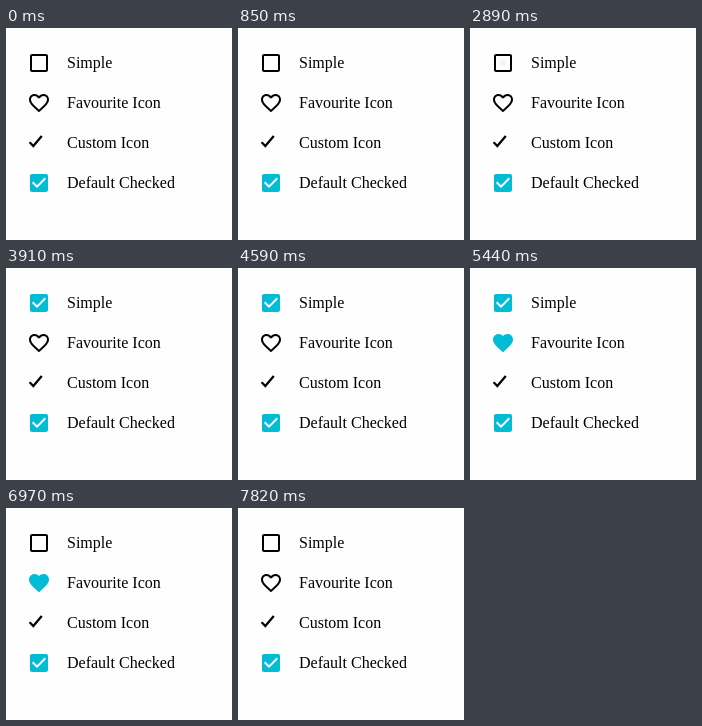
Recreate the animation shown at these times as an HTML page. Size 226x212 px, loop 7990 ms.

```html
<!DOCTYPE html>
<html lang="en">
<head>
<meta charset="utf-8">
<title>Checkboxes</title>
<style>
  html, body { margin: 0; width: 100%; height: 100%; overflow: hidden; background: #fefefe; }
  svg { display: block; width: 100vw; height: 100vh; }
  text { font: 16px "Liberation Serif", "Times New Roman", serif; fill: #000; }
  .on { fill: #00bcd4; }
</style>
</head>
<body>
<svg viewBox="0 0 226 212">
  <defs>
    <path id="box" d="M19 5v14H5V5h14m0-2H5c-1.1 0-2 .9-2 2v14c0 1.1.9 2 2 2h14c1.1 0 2-.9 2-2V5c0-1.1-.9-2-2-2z"/>
    <path id="checked" d="M19 3H5c-1.11 0-2 .9-2 2v14c0 1.1.89 2 2 2h14c1.11 0 2-.9 2-2V5c0-1.1-.89-2-2-2zm-9 14l-5-5 1.41-1.41L10 14.17l7.59-7.59L19 8l-9 9z"/>
    <path id="heart" d="M12 21.35l-1.45-1.32C5.4 15.36 2 12.28 2 8.5 2 5.42 4.42 3 7.5 3c1.74 0 3.41.81 4.5 2.09C13.09 3.81 14.76 3 16.5 3 19.58 3 22 5.42 22 8.5c0 3.78-3.4 6.86-8.55 11.54L12 21.35z"/>
    <path id="heartLine" d="M16.5 3c-1.74 0-3.41.81-4.5 2.09C10.91 3.81 9.24 3 7.5 3 4.42 3 2 5.42 2 8.5c0 3.78 3.4 6.86 8.55 11.54L12 21.35l1.45-1.32C18.6 15.36 22 12.28 22 8.5 22 5.42 19.58 3 16.5 3zm-4.4 15.55l-.1.1-.1-.1C7.14 14.24 4 11.39 4 8.5 4 6.5 5.5 5 7.5 5c1.54 0 3.04.99 3.57 2.36h1.87C13.46 5.99 14.96 5 16.5 5c2 0 3.5 1.5 3.5 3.5 0 2.89-3.14 5.74-7.9 10.05z"/>
  </defs>
  <g transform="translate(21 23)">
    <circle id="press" cx="12" cy="12" r="3" fill="#eff3f7"/>
    <use id="simpleOff" href="#box"/>
    <use id="simpleOn" class="on" href="#checked"/>
    <text x="40" y="17">Simple</text>
  </g>
  <g transform="translate(21 63)">
    <use id="heartOff" href="#heartLine"/>
    <use id="heartOn" class="on" href="#heart"/>
    <text x="40" y="17">Favourite Icon</text>
  </g>
  <g transform="translate(21 103)">
    <path d="M2.6 11.2L6.3 15L14.8 5" fill="none" stroke="#000" stroke-width="2.3"/>
    <text x="40" y="17">Custom Icon</text>
  </g>
  <g transform="translate(21 143)">
    <use class="on" href="#checked"/>
    <text x="40" y="17">Default Checked</text>
  </g>
</svg>
<script>
  const LOOP = 7990, STEP = 170, FADE = 450;
  const SIMPLE = [2890, 6120], HEART = [4590, 7310];
  const $ = id => document.getElementById(id);

  const ease = (t, from) => {
    const p = Math.min(1, Math.max(0, (t - from) / FADE));
    return 1 - (1 - p) ** 4;
  };

  function toggle(name, t, [on, off]) {
    const p = ease(t, on) - ease(t, off);
    $(name + 'On').setAttribute('opacity', p);
    $(name + 'Off').setAttribute('opacity', 1 - p);
  }

  function draw(time) {
    const t = Math.floor(time % LOOP / STEP) * STEP;
    toggle('simple', t, SIMPLE);
    toggle('heart', t, HEART);
    $('press').setAttribute('opacity', t === SIMPLE[0] ? 1 : 0);
  }

  const start = performance.now();
  function tick() {
    draw(performance.now() - start);
    requestAnimationFrame(tick);
  }
  tick();
</script>
</body>
</html>
```
